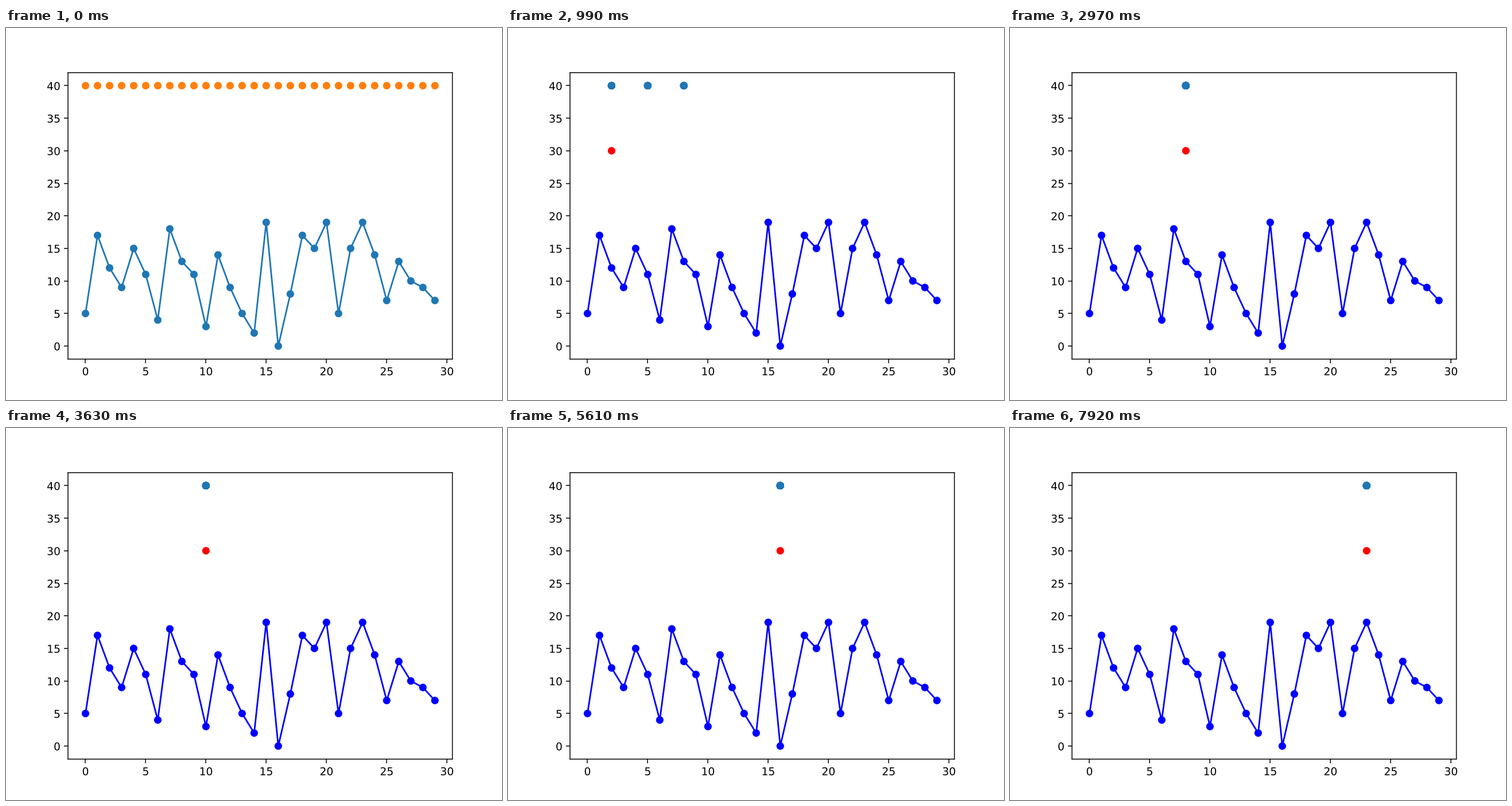
These frames come from a looping animation (864 by 648 pixels, 8 s). A matplotlib script:

```python
import numpy as np
import matplotlib.pyplot as plt
from matplotlib.animation import FuncAnimation
from matplotlib.patheffects import Normal

LOOP, TICK, STEP = 8000, 40, 330      # ms
COUNT, SETTLE = 30, 3

world = np.array([5, 17, 12, 9, 15, 11, 4, 18, 13, 11, 3, 14, 9, 5, 2,
                  19, 0, 8, 17, 15, 19, 5, 15, 19, 14, 7, 13, 10, 9, 7])
cells = np.arange(COUNT)

fig, ax = plt.subplots(figsize=(6.4, 4.8), dpi=135)
ax.set_xticks(range(0, 31, 5))
ax.set_yticks(range(0, 41, 5))

# Subpixel placement of frame and labels
for spine in ax.spines.values():
    spine.set_snap(False)
for label in ax.get_xticklabels() + ax.get_yticklabels():
    label.set_path_effects([Normal()])


def dots(x, y, color):
    group = ax.scatter(x, y, color=color, linewidths=1, zorder=3)
    group.set_sizes(np.full(2, 36))   # several sizes keep markers unsnapped
    return group


terrain, = ax.plot(cells, world)
peaks = dots(cells, world, "C0")
particles = dots(cells, np.full(COUNT, 40), "C1")
robot = dots([0], [30], "red")
ax.set_xlim(-1.45, 30.45)
ax.set_ylim(-2, 42)


def particle_cells(pos):
    """Particles move with the robot; ever closer readings are kept."""
    starts = cells
    for step in range(1, min(pos, SETTLE) + 1):
        miss = abs(world[(starts + step) % COUNT] - world[step])
        starts = starts[miss <= SETTLE - step]
    return np.resize(starts + max(pos, 0), COUNT)


def draw(frame):
    # Each tick shows the state reached by its end
    pos = (frame * TICK + TICK - 10) // STEP - 1
    started = pos >= 0
    for part in (terrain, peaks):
        part.set_color("blue" if started else "C0")
    particles.set_color("C0" if started else "C1")
    particles.set_offsets(np.c_[particle_cells(pos), np.full(COUNT, 40)])
    robot.set_offsets([[pos, 30]])
    robot.set_visible(started)
    return terrain, peaks, particles, robot


anim = FuncAnimation(fig, draw, frames=LOOP // TICK, interval=TICK,
                     repeat=True, repeat_delay=0)
plt.show()
```
